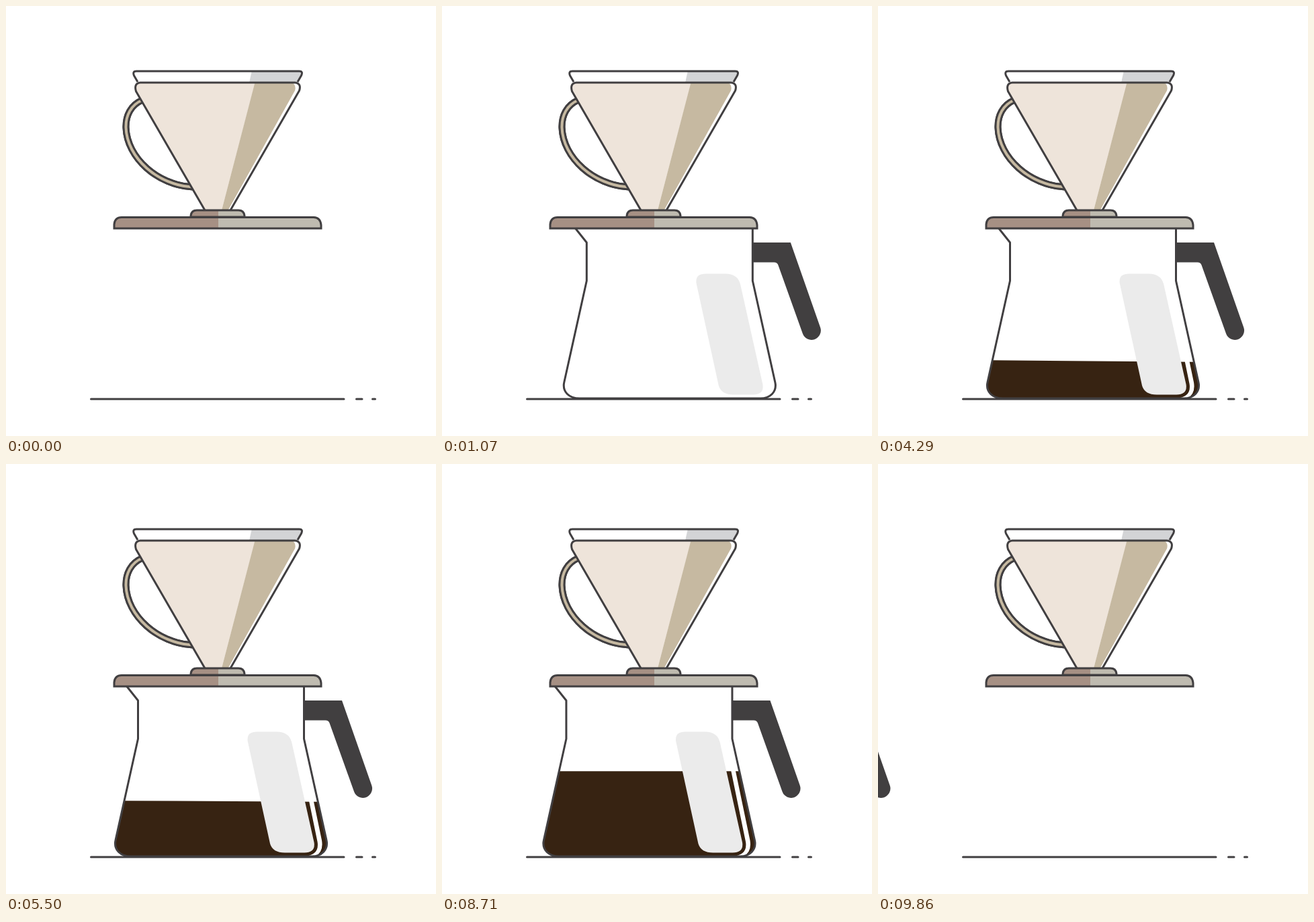
An HTML page that plays this animation: 640 by 640 pixels, repeating every 9.93 s.

```html
<!DOCTYPE html>
<html lang="en">
<head>
<meta charset="utf-8">
<title>Pour-over coffee</title>
<style>
  html, body { margin: 0; width: 100%; height: 100%; overflow: hidden; background: #fff; }
  svg { display: block; width: 100%; height: 100%; }
  .line { fill: none; stroke: #413f41; stroke-width: 3; stroke-linejoin: round; }
</style>
</head>
<body>
<svg viewBox="0 0 640 640">
  <defs>
    <path id="glass" d="M179 330L196.5 352V409L163 560C160 574 170 584 186 584H455C470 584 480 574 477 560L443.5 409V330"/>
    <path id="tray" d="M161 331V325Q162 314.5 172 314.5H458Q468 315 469 326V331Z"/>
    <path id="collar" d="M275 314V312Q276 304 284 304H346Q354 304 355 312V314Z"/>
    <path id="cone" d="M296 304L193.5 127Q190 115 200 114H430Q440 115 436.500 126L334 304"/>
    <path id="rim" d="M196 113L190.500 103.500Q188 97 194 97H436.500Q442.500 97 439.500 103.500L434 113"/>
    <clipPath id="inGlass"><use href="#glass"/></clipPath>
    <clipPath id="inRim"><use href="#rim"/></clipPath>
    <linearGradient id="split" gradientUnits="userSpaceOnUse" x1="315.9" x2="316.1" y1="0" y2="0">
      <stop stop-color="#a69084"/>
      <stop offset="1" stop-color="#bfbbb0"/>
    </linearGradient>
  </defs>

  <path class="line" stroke-linecap="round" d="M126.500 585H503M521.500 585H530M545.500 585H549.500"/>

  <g id="pot">
    <use href="#glass" fill="#fff"/>
    <g clip-path="url(#inGlass)">
      <polygon id="coffee" fill="#372312"/>
      <path fill="#fff" d="M432 409H438.500L470 560Q473 578 460 584H444Q467 582 463.500 562Z"/>
    </g>
    <path fill="#ebebeb" d="M359.800 413Q357.500 398.500 374 398.500H403Q421 398.500 425.200 414L458.500 563Q461 578.500 444 578.500H415Q397 578.500 393 565Z"/>
    <path fill="#413f40" d="M443 352H500L544.300 478.500A13.800 13.800 0 0 1 518 487.500L481.500 385.500Q480 381.500 475.500 381.500H443Z"/>
    <use href="#glass" class="line"/>
  </g>

  <g fill="none">
    <path id="grip" stroke="#413f41" stroke-width="10" d="M203 140C186 147 178 163 178.500 181C180 226 226 267 278 269.500"/>
    <use href="#grip"/>
    <path stroke="#c6b9a1" stroke-width="4" d="M203 140C186 147 178 163 178.500 181C180 226 226 267 278 269.500"/>
  </g>
  <path fill="#d3d4d6" clip-path="url(#inRim)" d="M366 96H445V114H362Z"/>
  <use href="#rim" class="line"/>
  <use href="#cone" fill="#fff"/>
  <path fill="#eee4da" d="M296 304L193.500 127Q190 115 200 114H371L321 304Z"/>
  <path fill="#c6b9a1" d="M370.500 114H425Q432.500 117 430 126L330.500 304H321Z"/>
  <use href="#cone" class="line"/>
  <use href="#collar" fill="url(#split)"/>
  <use href="#collar" class="line"/>
  <use href="#tray" fill="url(#split)"/>
  <use href="#tray" class="line" style="stroke-linejoin: miter"/>
</svg>
<script>
  const LOOP = 9930, FPS = 14;
  const pot = document.getElementById('pot');
  const coffee = document.getElementById('coffee');

  // Both slides are quartics that settle to zero speed beside the tray.
  const slide = (u, a, b, c) => u > 0 ? Math.max(0, u * u * (a + b * u + c * u * u)) : 0;
  const potX = t => t < 4000
    ? slide((1500 - t) / 1000, -31, 367, -130)
    : -slide((t - 8395) / 1000, 136.4, -113, 128.7);

  function draw(t) {
    pot.setAttribute('transform', `translate(${potX(t).toFixed(2)})`);

    const fill = t - 1650;
    const level = fill > 0 ? Math.max(457.2, 583.9 - 0.0215 * fill) : 600;
    const tilt = 4.5 * Math.max(0, 1 - fill / 5920);
    coffee.setAttribute('points', `170,${level} 470,${level + tilt} 490,${level + tilt} 490,600 150,600 150,${level}`);
  }

  const start = performance.now();
  function tick() {
    const t = (performance.now() - start) % LOOP;
    draw(Math.floor((t + 5) * FPS / 1000) * 1000 / FPS);
    requestAnimationFrame(tick);
  }
  tick();
</script>
</body>
</html>
```
